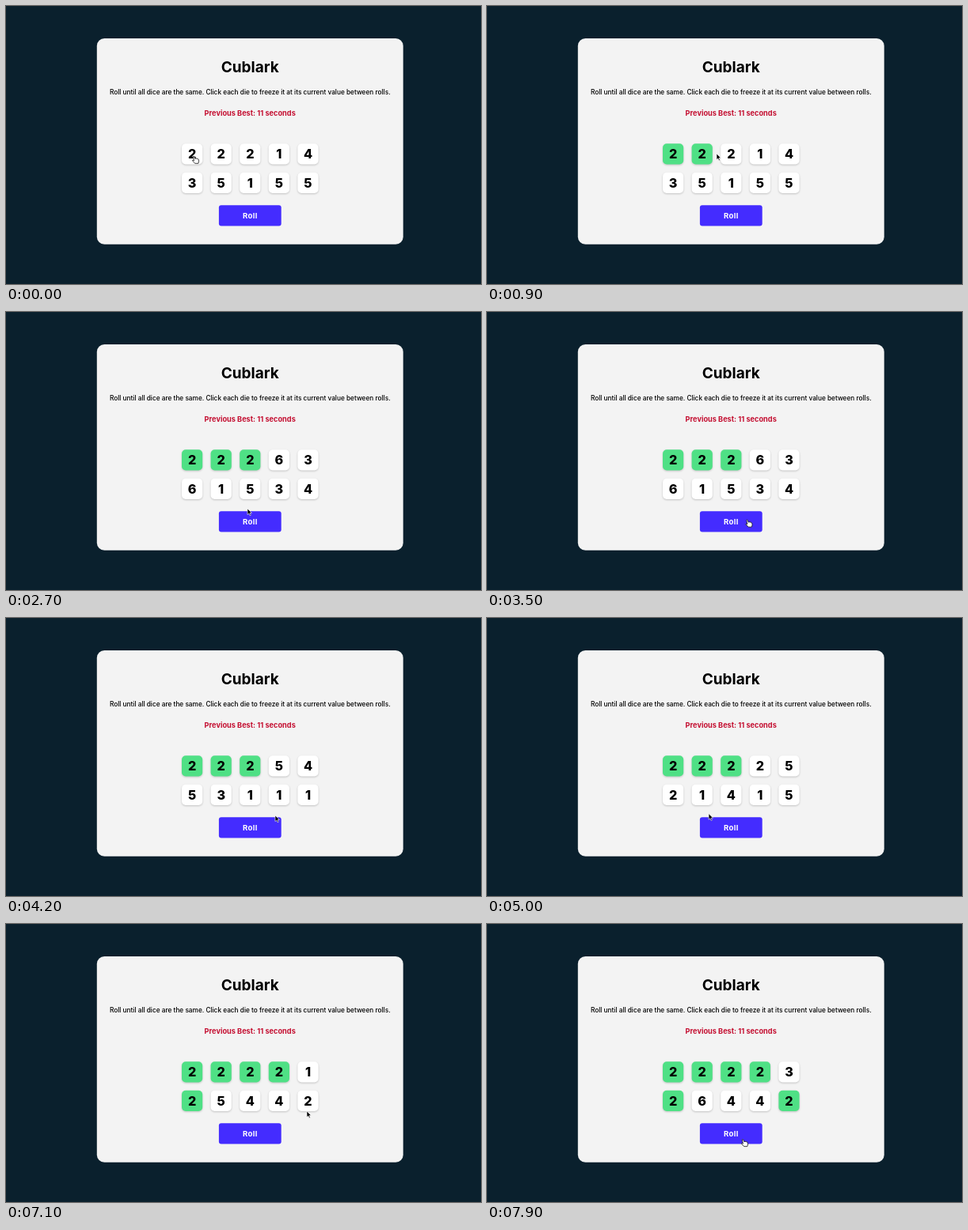
An HTML page that plays this animation: 600 by 352 pixels, repeating every 8 s.

```html
<!DOCTYPE html>
<html lang="en">
<head>
<meta charset="utf-8">
<title>Cublark</title>
<style>
  html, body { margin: 0; width: 100%; height: 100%; overflow: hidden; background: #0a202d; }
  svg { display: block; width: 600px; height: 352px; }
  text { font-family: Inter, "Open Sans", sans-serif; font-weight: 700; text-anchor: middle; }
  .intro { font-size: 8.28px; font-weight: 500; }
  .face { font-size: 16.2px; font-weight: 800; }
  .die { filter: drop-shadow(0 1px 1px rgba(0, 0, 0, .2)); }
</style>
</head>
<body>
<svg viewBox="0 0 600 352">
  <rect x="114.8" y="41" width="386.9" height="260.8" rx="9.5" fill="#f3f3f3"/>
  <text x="308.2" y="83.6" font-size="19">Cublark</text>
  <text x="308.3" y="111.6" class="intro">Roll until all dice are the same. Click each die to freeze it at its current value between rolls.</text>
  <text x="308.2" y="138.5" font-size="9.2" fill="#c40f31">Previous Best: 11 seconds</text>
  <g id="dice"></g>
  <rect x="268.9" y="252.2" width="78.8" height="26.3" rx="3" fill="#442cff"/>
  <text x="308.4" y="268.7" font-size="9.6" letter-spacing=".4" fill="#fff">Roll</text>
  <g id="cursor">
    <circle id="ring" r="16" fill="none" stroke="#111"/>
    <path id="arrow" d="M0 0V7.6L1.8 6L3 8.8L4.3 8.2L3.1 5.5H5.5Z" fill="#000" stroke="#fff" stroke-width=".6"/>
    <path id="hand" d="M-.8 .5Q0 -.6 .8 .5L1.7 3L3 2.7L4.2 2.9L5.6 3.4Q6.7 4.6 6.5 6.5L5.8 9H1.8L-1.6 5.8Q-1.8 4.7 -.6 5L.4 5.6Z" fill="#fff" stroke="#111" stroke-width=".8" stroke-linejoin="round"/>
  </g>
</svg>
<script>
const LOOP = 8000, STEP = 100, REST = 200;
const $ = id => document.getElementById(id);

const add = (tag, attrs) => {
  const el = document.createElementNS("http://www.w3.org/2000/svg", tag);
  for (const key in attrs) el.setAttribute(key, attrs[key]);
  return $("dice").appendChild(el);
};
const dice = Array.from({ length: 10 }, (_, i) => {
  const col = i % 5, x = 235.1 + col * 36.6, y = 187.3 + Math.floor(i / 5) * 36.5;
  return {
    x, y, col,
    box: add("rect", { class: "die", x: x - 13.1, y: y - 13.1, width: 26.2, height: 26.2, rx: 5 }),
    face: add("text", { class: "face", x, y: y + 5.9 })
  };
});

// Steps of the game: where the pointer is at a time, and what it does there
const glance = (at, x, y) => ({ at, x, y, rest: 0 });
const hold = (at, die) => {
  const { x, y, col } = dice[die];
  return { at, die, x: x + 2 - col, y: y + 3 + col, rest: REST };
};
const roll = (at, values) => ({ at, values, x: 323, y: 263 + at / 800, rest: REST });

const steps = [
  hold(100, 0), hold(600, 1), glance(900, 290, 187), hold(1200, 2), roll(1800, "6361534"),
  glance(2700, 305, 249), glance(3100, 376, 226), roll(3600, "5453111"),
  glance(4200, 340, 250), roll(4500, "2521415"),
  hold(5300, 5), hold(5900, 3), roll(6400, "15442"),
  glance(7100, 380, 237), hold(7200, 9), roll(7700, "3644")
];

function board(t) {
  const values = [..."2221435155"], held = new Set();
  for (const step of steps.filter(s => s.at + STEP <= t)) {
    if (step.die !== undefined) held.add(step.die);
    if (step.values) {
      const free = values.keys().filter ? [...values.keys()] : Object.keys(values).map(Number);
      free.filter(i => !held.has(i)).forEach((die, i) => values[die] = step.values[i]);
    }
  }
  return { values, held };
}

function pointer(t) {
  const next = steps.findIndex(s => s.at > t);
  if (next === 0) return steps[0];
  const a = steps.at(next < 0 ? -1 : next - 1), b = next < 0 ? a : steps[next];
  const leave = a.at + a.rest;
  if (t <= leave || a === b) return a;
  const u = (t - leave) / (b.at - leave), e = u * u * (3 - 2 * u);
  return { x: a.x + (b.x - a.x) * e, y: a.y + (b.y - a.y) * e };
}

const inside = (p, x, y, w, h) => Math.abs(p.x - x) < w / 2 && Math.abs(p.y - y) < h / 2;
const show = (id, on) => $(id).setAttribute("visibility", on ? "visible" : "hidden");

function draw(t) {
  const { values, held } = board(t);
  dice.forEach(({ box, face }, i) => {
    box.setAttribute("fill", held.has(i) ? "#4fe085" : "#fff");
    face.textContent = values[i];
  });
  const p = pointer(t);
  const over = inside(p, 308.3, 265.4, 78.6, 26) || dice.some(d => inside(p, d.x, d.y, 26, 26));
  $("cursor").setAttribute("transform", `translate(${p.x} ${p.y})`);
  show("hand", over);
  show("arrow", !over);
  show("ring", steps.some(s => t >= s.at && t < s.at + s.rest));
}

const start = performance.now();
function tick() {
  const t = (performance.now() - start) % LOOP;
  draw(Math.floor(t / STEP) * STEP);
  requestAnimationFrame(tick);
}
tick();
</script>
</body>
</html>
```
